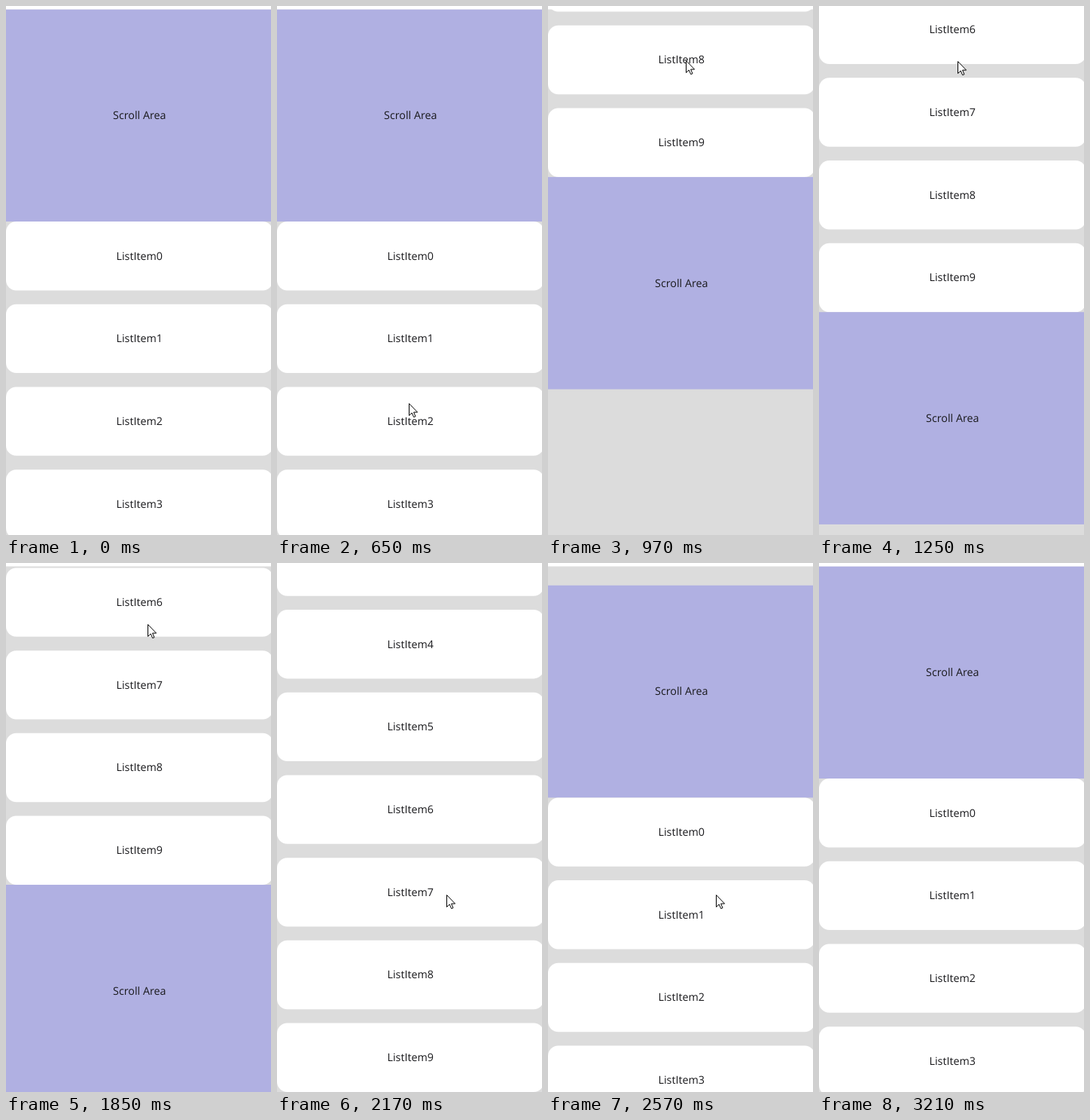
An HTML page that plays this animation: 352 by 702 pixels, repeating every 3.75 s.

```html
<!DOCTYPE html>
<html lang="en">
<head>
<meta charset="utf-8">
<title>Nested scroll</title>
<style>
  html, body { margin: 0; width: 100%; height: 100%; overflow: hidden; background: #fff; }
  #stage { display: block; width: 352px; height: 702px; }
  text {
    font: 14.3px "Open Sans", "Noto Sans", sans-serif; fill: #19191c;
    text-anchor: middle; text-rendering: geometricPrecision;
  }
  .area { fill: #b0b0e2; }
  .item { fill: #fff; }
</style>
</head>
<body>
<svg id="stage" viewBox="0 0 352 702">
  <rect y="4" width="352" height="698" fill="#dcdcdc"/>
  <g id="list"></g>
  <rect width="352" height="4.5" fill="#fff"/>
  <path id="cursor" d="M.5 .6V16.5L4.2 13L6.7 18.6L9 17.7L6.6 12.1H11.6Z" fill="#fff" stroke="#000"/>
</svg>
<script>
  const LOOP = 3750, FRAME = 40;
  const TOP = 4.3, AREA = 281.7, PITCH = 109.72, ITEM = 91.4, COUNT = 10, WIDTH = 354.6;
  const FIRST = TOP + AREA;
  const FOOT = FIRST + (COUNT - 1) * PITCH + ITEM;
  const END = FOOT + AREA - 702;
  const HIT_END = 900, HIT_TOP = 2320;
  const list = document.getElementById('list');
  const cursor = document.getElementById('cursor');

  function make(tag, attrs) {
    const el = document.createElementNS('http://www.w3.org/2000/svg', tag);
    for (const key in attrs) el.setAttribute(key, attrs[key]);
    list.append(el);
    return el;
  }

  function add(kind, label, y, height, rx) {
    make('rect', { class: kind, y, width: WIDTH, height, rx });
    make('text', { x: WIDTH / 2, y: y + height / 2 + 4.9 }).textContent = label;
  }

  add('area', 'Scroll Area', TOP, AREA, 0);
  for (let i = 0; i < COUNT; i++) add('item', 'ListItem' + i, FIRST + i * PITCH, ITEM, 13.7);
  add('area', 'Scroll Area', FOOT, AREA, 0);

  // Each key: time, easing power towards it, values
  const pointer = [
    [80, 1, 28, 634], [280, 1, 175, 531], [610, 1, 175, 531], [650, 1, 175, 527],
    [850, 2, 183, 72], [970, 1, 183, 72], [1770, 1, 187, 74], [1850, 1, 188, 81],
    [2170, 2.5, 225, 440], [2570, 1, 223, 440]
  ];
  const drag = [
    [650, 1, 0], [820, 2.5, 385], [HIT_END, 1, END], [1770, 1, END],
    [1850, 1, 937.9], [2170, 3, 662.9], [HIT_TOP, 1, 0]
  ];

  function track(keys, t) {
    const n = keys.findIndex(k => k[0] > t);
    if (n === 0) return keys[0].slice(2);
    if (n < 0) return keys[keys.length - 1].slice(2);
    const a = keys[n - 1], b = keys[n];
    const s = ((t - a[0]) / (b[0] - a[0])) ** b[1];
    return a.slice(2).map((v, i) => v + (b[i + 2] - v) * s);
  }

  // Critically damped edge bounce, speed in px/ms
  function bounce(speed, ms) {
    return ms > 0 ? speed * ms * Math.exp(-0.0151 * ms) : 0;
  }

  function scrollAt(t) {
    if (t >= 3210) return 0;
    let y = track(drag, t)[0];
    if (t < 1770) y += bounce(7.95, t - HIT_END);
    return y - bounce(4.43, t - HIT_TOP);
  }

  function draw(now) {
    const t = now % LOOP;
    const shift = t < 650 ? 0 : 10;
    const step = Math.floor((t - shift) / FRAME) * FRAME + shift;
    const [x, y] = track(pointer, step);
    list.setAttribute('transform', `translate(0 ${(-scrollAt(step)).toFixed(2)})`);
    cursor.setAttribute('transform', `translate(${Math.round(x)} ${Math.round(y)})`);
    cursor.style.visibility = step >= 80 && step < 3210 ? 'visible' : 'hidden';
  }

  const start = performance.now();
  function tick() {
    draw(performance.now() - start);
    requestAnimationFrame(tick);
  }
  tick();
</script>
</body>
</html>
```
